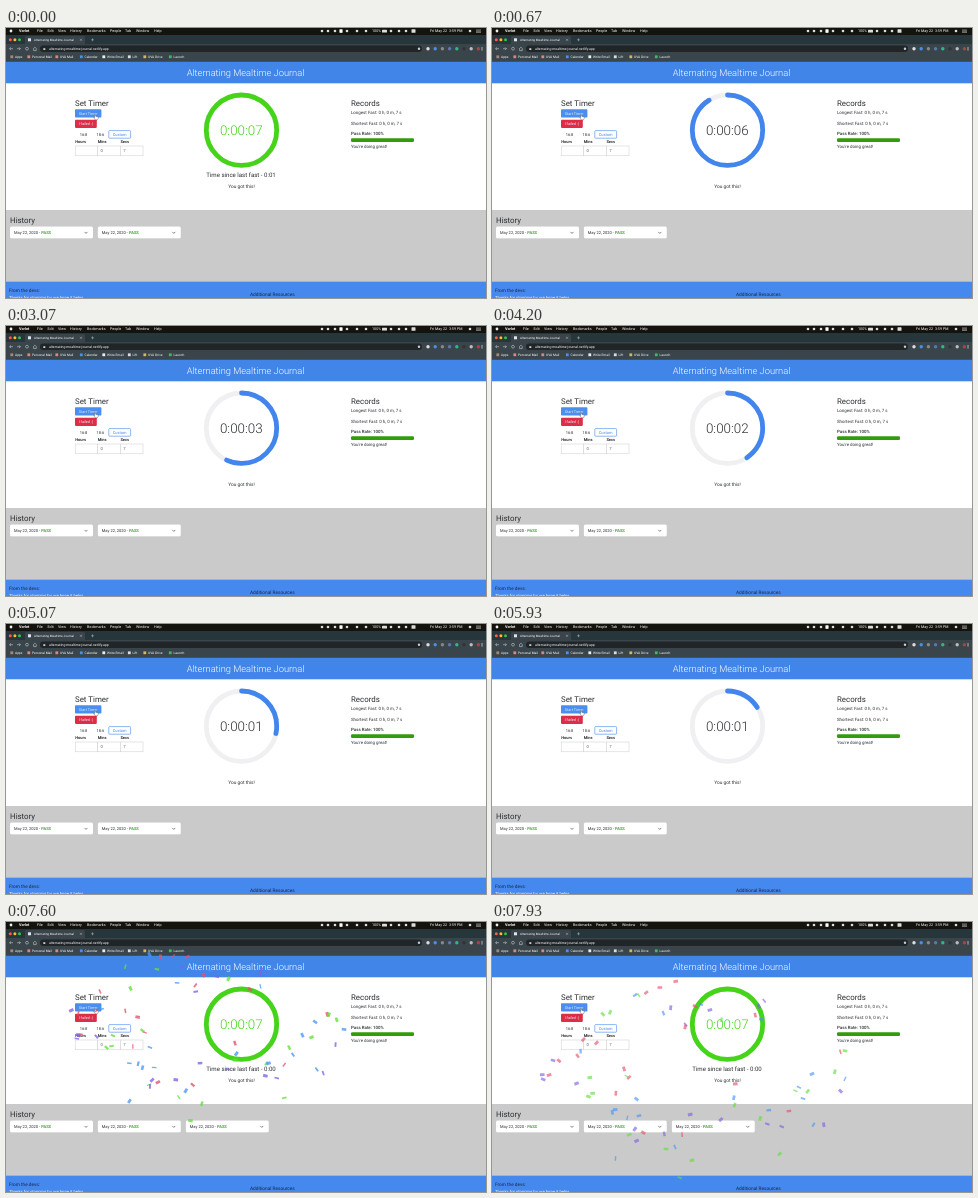
These frames come from a looping animation (480 by 270 pixels, 8 s). An HTML page:

```html
<!DOCTYPE html>
<html lang="en">
<head>
<meta charset="utf-8">
<title>Alternating Mealtime Journal</title>
<style>
  html, body { margin: 0; width: 100%; height: 100%; overflow: hidden; background: #fff; }
  svg { display: block; width: 100%; height: 100%; }
  text { font-family: Roboto, "Open Sans", sans-serif; text-rendering: geometricPrecision; white-space: pre; }
</style>
</head>
<body>
<svg id="stage" viewBox="0 0 480 270"></svg>
<script>
const stage = document.getElementById('stage');
const INK = '#2b2f33', BLUE = '#4285ec', GREEN = '#45d41a', RED = '#dc2f47';

function add(tag, attrs, parent = stage) {
  const node = document.createElementNS('http://www.w3.org/2000/svg', tag);
  for (const key in attrs) node.setAttribute(key, attrs[key]);
  parent.append(node);
  return node;
}
const rect = (x, y, width, height, fill, more) => add('rect', { x, y, width, height, fill, ...more });
const dot = (cx, cy, r, fill, more) => add('circle', { cx, cy, r, fill, ...more });
const line = (d, stroke, width = 0.6) => add('path', { d, stroke, 'stroke-width': width, fill: 'none' });
function text(string, x, y, size, fill = INK, more) {
  const node = add('text', { x, y, 'font-size': size, fill, ...more });
  node.textContent = string;
  return node;
}
const BOLD = { 'font-weight': 600 };
const LIGHT = { 'font-weight': 300 };
const MIDDLE = { 'text-anchor': 'middle' };

function drawMenuBar() {
  rect(0, 0, 480, 7, '#15130e');
  dot(5, 3, 1.4, '#eee');
  text('Vorlet', 13, 4.3, 3.8, '#fff', { 'font-weight': 700 });
  const items = [['File', 31], ['Edit', 41.5], ['View', 52], ['History', 64], ['Bookmarks', 81],
    ['People', 104], ['Tab', 119], ['Window', 130], ['Help', 148]];
  for (const [label, x] of items) text(label, x, 4.3, 3.7, '#fff');
  for (const x of [316, 322, 329, 335, 341, 351, 360, 385, 393, 400, 464]) dot(x, 3, 1.3, '#ddd');
  rect(333.5, 1.3, 3, 3.5, '#fff');
  rect(405.5, 1.2, 4, 3.6, '#ddd', { rx: 0.5 });
  text('100%', 366, 4.3, 3.7, '#fff');
  rect(376, 1.8, 5, 2.6, '#ddd', { rx: 0.5 });
  text('Fri May 22  3:59 PM', 424, 4.3, 3.7, '#fff');
  line('M470 2h5M470 3.2h5M470 4.4h5', '#ddd', 0.5);
}

function drawBrowser() {
  rect(0, 7, 480, 9, '#27363a');
  ['#fb5b53', '#fbbd2e', '#2ac940'].forEach((color, i) => dot(4.3 + 4.6 * i, 11.8, 1.5, color));
  rect(19, 8, 60, 9, '#39454a', { rx: 1.5 });
  rect(22, 10.3, 3, 3, '#dfe5ee');
  text('Alternating Mealtime Journal', 28, 13, 3.1, '#fff');
  line('M74 10.8l2 2m0 -2l-2 2M85 11.8h3m-1.5 -1.5v3', '#ddd', 0.4);

  rect(0, 16, 480, 18, '#39454a');
  rect(34, 17.5, 382, 6.6, '#202528', { rx: 3.3 });
  line('M7 20.7h-3.4m1.4 -1.4l-1.4 1.4l1.4 1.4M11 20.7h3.4m-1.4 -1.4l1.4 1.4l-1.4 1.4', '#ddd', 0.5);
  dot(21, 20.7, 1.4, 'none', { stroke: '#ddd', 'stroke-width': 0.5 });
  line('M27 21l1.9 -1.8l1.9 1.8m-3.2 0v1.6h2.6v-1.6', '#ddd', 0.5);
  rect(37.3, 20.2, 2, 1.8, '#ccc');
  text('alternating-mealtime-journal.netlify.app', 43, 21.9, 3.45, '#fff');
  dot(413, 20.8, 1.2, '#ccc');
  ['#ddd', '#4a90e2', '#888', '#5a78b0', '#31b58e', '#333', '#bbb', '#a44']
    .forEach((color, i) => dot(422 + 7.2 * i, 20.7, 1.7, color));
  line('M476 19v3.6', '#ddd', 0.7);

  const bookmarks = [['Apps', 9, '#a87'], ['Personal Mail', 26, '#d98880'], ['UVA Mail', 54, '#d98880'],
    ['Calendar', 78.5, '#4a8ef0'], ['Write Email', 101, '#eee'], ['Lift', 126.5, '#ddd'],
    ['UVA Drive', 142, '#d5b85a'], ['Launch', 167.5, '#3cba63']];
  for (const [label, x, color] of bookmarks) {
    rect(x - 4.6, 27.4, 2.8, 2.8, color);
    text(label, x, 30, 3.3, '#fff');
  }
}

function drawButton(label, x, y, width, height, fill) {
  rect(x, y, width, height, fill, { rx: 0.8 });
  text(label, x + width / 2, y + height / 2 + 1.3, 3.8, '#dfeaff', MIDDLE);
}

function drawSetup() {
  text('Set Timer', 69, 78, 7.9);
  drawButton('Start Timer', 69, 81.2, 26.4, 8.3, '#4a8ff0');
  drawButton('I failed :(', 69, 91.7, 21.8, 8.2, RED);
  text('16:8', 77.5, 107.9, 4, INK, MIDDLE);
  text('18:6', 94.3, 107.9, 4, INK, MIDDLE);
  rect(102.8, 102.6, 21.8, 7.6, '#fff', { rx: 0.8, stroke: BLUE, 'stroke-width': 0.6 });
  text('Custom', 113.6, 107.8, 4, BLUE, MIDDLE);
  [['Hours', ''], ['Mins', '0'], ['Secs', '7']].forEach(([label, value], i) => {
    const x = 69.2 + 22.6 * i;
    text(label, x, 114.8, 4, INK, BOLD);
    rect(x, 118, 22.6, 9.8, '#fff', { stroke: '#ccc', 'stroke-width': 0.5 });
    text(value, x + 2.8, 124.4, 4.2, '#666');
  });
}

function drawRecords() {
  text('Records', 345, 78, 7.9);
  text('Longest Fast: 0 h, 0 m, 7 s', 345, 86.4, 4.4);
  text('Shortest Fast: 0 h, 0 m, 7 s', 345, 97, 4.4);
  text('Pass Rate: 100%', 345, 106.9, 4.4, INK, { 'font-weight': 500 });
  rect(345, 110.2, 63, 3.8, '#329c0c', { rx: 1.2 });
  text("You're doing great!", 345, 119.6, 4.4);
}

function drawCard(x) {
  const group = add('g', {});
  group.append(
    rect(x, 198.8, 83, 12, '#b4b4b4', { rx: 1.5 }),
    rect(x, 198.4, 83, 12, '#fff', { rx: 1.5 }));
  const label = text('May 22, 2020 - ', x + 4, 206, 4.05);
  add('tspan', { fill: '#249414', 'font-weight': 500 }, label).textContent = 'PASS';
  group.append(label, line(`M${x + 74.5} 203.9l1.5 1.5l1.5 -1.5`, '#333', 0.6));
  return group;
}

rect(0, 0, 480, 270, '#fff');
drawMenuBar();
drawBrowser();
rect(0, 33.8, 480, 21.5, '#4285e9');
text('Alternating Mealtime Journal', 239.5, 48, 9.3, '#fff', { ...MIDDLE, ...LIGHT });
drawSetup();
drawRecords();

const RADIUS = 35.2, LENGTH = 2 * Math.PI * RADIUS;
const ringShape = { 'stroke-width': 4.8 };
dot(235.5, 102.2, RADIUS, 'none', { ...ringShape, stroke: '#f0f0f2' });
const ring = dot(235.5, 102.2, RADIUS, 'none', {
  ...ringShape, 'stroke-linecap': 'round', transform: 'rotate(-90 235.5 102.2)' });
const clock = text('', 235.3, 107, 13.4, INK, { ...MIDDLE, ...LIGHT });
const since = text('', 235, 149.2, 6.1, INK, MIDDLE);
text('You got this!', 235.5, 160, 4.8, INK, MIDDLE);

rect(0, 182, 480, 71.5, '#cacaca');
text('History', 4, 194.8, 7.9);
drawCard(4);
drawCard(91.8);
const newCard = drawCard(179.8);

rect(0, 253.5, 480, 17, '#4588ee');
text('From the devs:', 3, 264, 4.7, '#17283f');
text('Thanks for stopping by, we hope it helps', 3, 271.2, 4.2, '#fff');
text('Additional Resources', 244, 268, 4.75, '#17283f');

// Hand pointer over the start button
add('path', { d: 'M88.6 86.2q.7 -.6 1.1 .3v1.7l2.2 .6q.6 .4 .2 2l-.6 1h-2.2l-1.6 -2.2q.1 -.8 .9 -.1z',
  fill: '#fff', stroke: '#222', 'stroke-width': 0.35 });

const random = n => { const v = Math.sin(n * 127.1 + 11.7) * 43758.5453; return v - Math.floor(v); };
const confetti = Array.from({ length: 75 }, (_, i) => {
  const angle = random(i) * 2 * Math.PI;
  const reach = 0.25 + 0.75 * Math.sqrt(random(i + 100));
  return {
    node: rect(-2.3, -1.5, 4.6, 3, ['#4a96f5', '#62e03c', '#e8506c', '#8062e4'][i % 4]),
    dx: 166 * reach * Math.cos(angle),
    dy: 92 * reach * Math.sin(angle),
    delay: 0.28 * random(i + 200),
    turn: 360 * random(i + 300),
    spin: 500 * (random(i + 400) - 0.5)
  };
});

// Pieces grow as they leave the origin, slow down through drag, fall and fade.
function moveConfetti(seconds) {
  for (const { node, dx, dy, delay, turn, spin } of confetti) {
    const age = seconds - delay;
    node.style.display = age > 0 ? '' : 'none';
    if (age <= 0) continue;
    const spread = 1 - Math.exp(-5 * age);
    const x = 186 + 12 * age + dx * spread;
    const y = 86 + dy * spread + 115 * age * age;
    const size = Math.min(1, age / 0.1);
    const tumble = size * (0.4 + 0.6 * Math.abs(Math.cos(age * 7 + turn)));
    node.setAttribute('transform', `translate(${x} ${y}) rotate(${turn + spin * age}) scale(${size} ${tumble})`);
    node.setAttribute('opacity', Math.max(0, 1 - 0.4 * seconds));
  }
}

const LOOP = 8000, START = 65, ZERO = 50, FINISH = 7050, FAST = 7000;

function draw(time) {
  const running = time >= START && time < FINISH;
  const done = time >= FINISH;
  const left = Math.min(FAST, FAST - (time - ZERO));
  const fraction = running ? left / FAST : 1;
  ring.setAttribute('stroke', running ? BLUE : GREEN);
  ring.setAttribute('stroke-dasharray', `${fraction * LENGTH} ${LENGTH}`);
  clock.textContent = '0:00:0' + (running ? Math.floor(left / 1000) : 7);
  clock.setAttribute('fill', running ? INK : GREEN);
  since.textContent = running ? '' : 'Time since last fast - 0:0' + (done ? 0 : 1);
  newCard.style.display = done ? '' : 'none';
  moveConfetti((time - FINISH) / 1000);
}

const origin = performance.now();
function tick() {
  draw((performance.now() - origin) % LOOP);
  requestAnimationFrame(tick);
}
tick();
</script>
</body>
</html>
```
